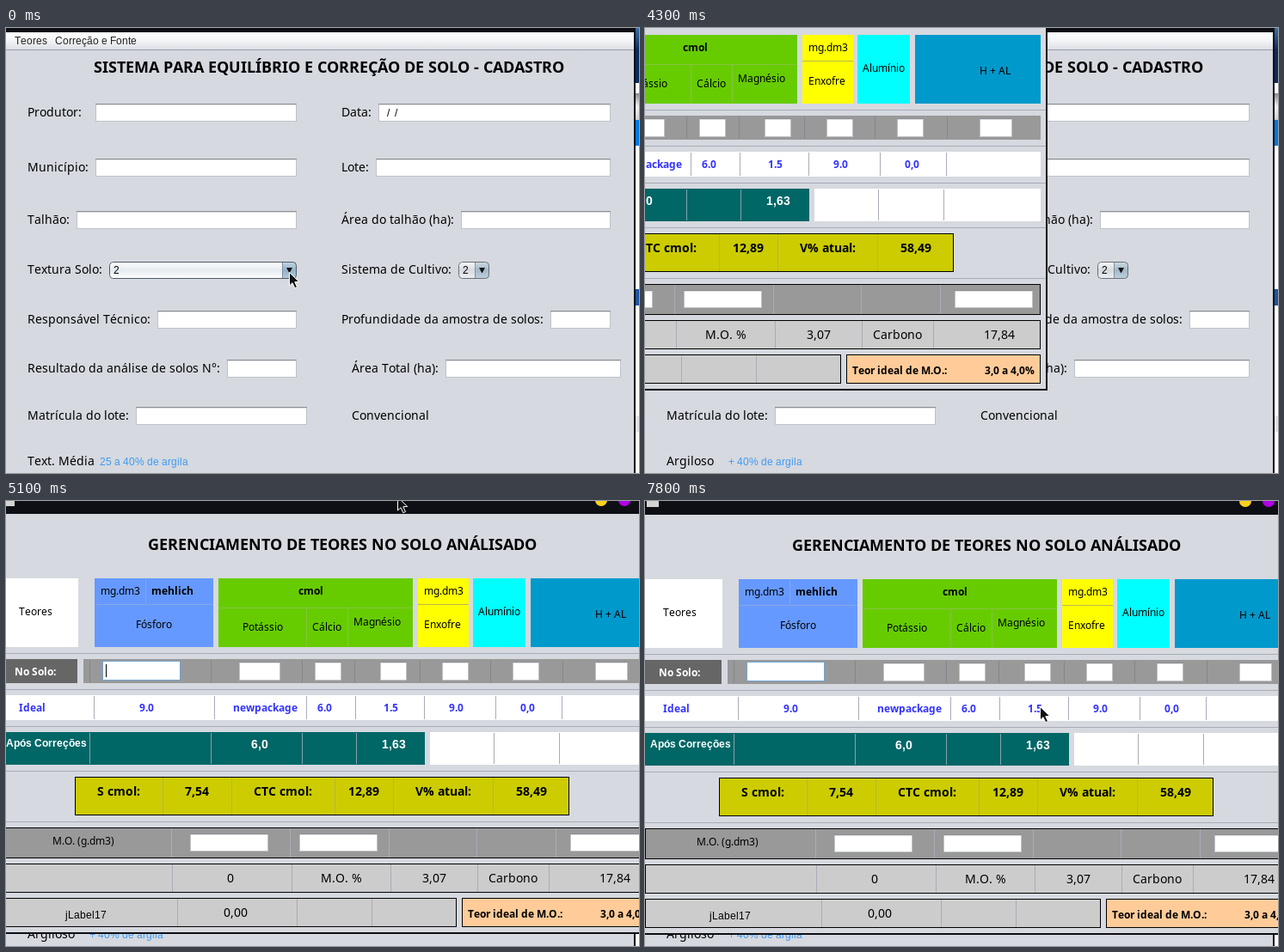
Write an HTML page with a canvas that moves like this. It is 736 by 518 pixels and loops after 8 s.

```html
<!DOCTYPE html>
<html lang="pt">
<head>
<meta charset="utf-8">
<style>
html, body { margin: 0; width: 100%; height: 100%; overflow: hidden; }
canvas { display: block; }
</style>
</head>
<body>
<canvas id="stage" width="736" height="518"></canvas>
<script>
const ctx = document.getElementById('stage').getContext('2d');
const NOTO = '"Noto Sans", sans-serif', ARIAL = '"Liberation Sans", sans-serif';
const F14 = '14px ' + NOTO, F12 = '12px ' + NOTO, B18 = 'bold 18px ' + NOTO;
const B14 = 'bold 14px ' + NOTO, B12 = 'bold 12px ' + NOTO;
const A12 = '12px ' + ARIAL, AB12 = 'bold 12px ' + ARIAL, AB14 = 'bold 14px ' + ARIAL;
const BLACK = '#0d0f14', PANEL = '#d6d9df', LINE = '#a9acb8', SELECT = '#39698a';

// Whole-pixel glyph advances, as the toolkit lays text out.
const advance = ch => Math.round(ctx.measureText(ch).width);

// Returns the x where the text ends.
function text(str, x, y, font = F14, color = '#000') {
  ctx.font = font;
  ctx.fillStyle = color;
  for (const ch of str) {
    ctx.fillText(ch, x, y);
    x += advance(ch);
  }
  return x;
}
function centered(str, x1, x2, y, font, color) {
  ctx.font = font;
  const width = [...str].reduce((sum, ch) => sum + advance(ch), 0);
  text(str, Math.round((x1 + x2 - width) / 2), y, font, color);
}
function rect(x1, y1, x2, y2, color) {
  ctx.fillStyle = color;
  ctx.fillRect(x1, y1, x2 - x1, y2 - y1);
}
function framed(x1, y1, x2, y2, color, border = '#000') {
  rect(x1, y1, x2, y2, border);
  rect(x1 + 1, y1 + 1, x2 - 1, y2 - 1, color);
}
function fade(y1, y2, ...colors) {
  const g = ctx.createLinearGradient(0, y1, 0, y2);
  colors.forEach((c, i) => g.addColorStop(i / (colors.length - 1), c));
  return g;
}
function path(points, x, y) {
  ctx.beginPath();
  points.forEach(([dx, dy]) => ctx.lineTo(x + dx, y + dy));
  ctx.closePath();
}
function circle(x, y, r, color) {
  ctx.fillStyle = color;
  ctx.beginPath();
  ctx.arc(x, y, r, 0, 7);
  ctx.fill();
}
function roundBox(x, y, w, h, r) {
  ctx.beginPath();
  ctx.roundRect(x, y, w, h, r);
}
function field(x1, y1, x2, y2 = y1 + 21) {
  framed(x1, y1, x2, y2, '#fff', '#bfc2c8');
  rect(x1, y1, x2, y1 + 1, '#8d8f94');
  rect(x1 + 1, y1 + 1, x2 - 1, y1 + 2, '#dcdde0');
}
// A band of cells between the given edges, each label centred in its cell.
function row(y1, y2, edges, labels, baseline, fill, { font = F12, color = '#000', line = LINE, border } = {}) {
  const left = edges[0], right = edges[edges.length - 1];
  framed(left, y1, right, y2, fill, border || fill);
  edges.slice(1, -1).forEach(x => rect(x, y1 + 1, x + 1, y2 - 1, line));
  labels.forEach((label, i) => centered(label, edges[i], edges[i + 1], baseline, font, color));
}
// Linear motion through [time, x, y] points.
function along(points, t) {
  const i = points.findIndex(p => t < p[0]);
  if (i <= 0) return points[i < 0 ? points.length - 1 : 0].slice(1);
  const a = points[i - 1], b = points[i], k = (t - a[0]) / (b[0] - a[0]);
  return [1, 2].map(j => Math.round(a[j] + (b[j] - a[j]) * k));
}
function cursor([x, y]) {
  path([[.5, .5], [.5, 16], [4, 12.7], [6.8, 18.7], [9.5, 17.5], [6.8, 11.7], [11.7, 11.4]], x, y);
  ctx.fillStyle = '#111';
  ctx.fill();
  ctx.strokeStyle = '#fff';
  ctx.lineWidth = 1;
  ctx.stroke();
}

const comboStyles = {
  normal: { body: ['#fafbfc', '#d6d9df', '#eef0f3'], arrow: ['#cfdce4', '#a3b8c7', '#c0d2dd'], tip: '#111', edge: '#6a7079' },
  hover: { body: ['#ffffff', '#e6ebf1', '#ffffff'], arrow: ['#c3d5e2', '#94b2c7', '#b2ccdd'], tip: '#111', edge: '#525b66' },
  pressed: { body: ['#8b929c', '#a6acb6', '#c1c6ce'], arrow: ['#2f5a7c', '#467597', '#6f9dbd'], tip: '#fff', edge: '#2b4257' }
};
function combo(x1, x2, value, style, glow) {
  const y = 272, h = 20, w = x2 - x1, split = x2 - 17, s = comboStyles[style];
  ctx.save();
  if (glow) {
    roundBox(x1 - 1.5, y - 1.5, w + 3, h + 3, 5);
    ctx.fillStyle = '#7fa9cb';
    ctx.fill();
  }
  roundBox(x1, y, w, h, 4);
  ctx.clip();
  rect(x1, y, x2, y + h, fade(y, y + h, ...s.body));
  rect(split, y, x2, y + h, fade(y, y + h, ...s.arrow));
  rect(split, y, split + 1, y + h, '#7d92a3');
  ctx.restore();
  roundBox(x1 + .5, y + .5, w - 1, h - 1, 4);
  ctx.strokeStyle = s.edge;
  ctx.lineWidth = 1;
  ctx.stroke();
  path([[-3.5, 0], [3.5, 0], [0, 6.5]], split + 8.5, y + 7);
  ctx.fillStyle = s.tip;
  ctx.fill();
  text(value, x1 + 5, y + 14, A12);
}

function desktop() {
  rect(0, 0, 736, 518, '#fff');
  rect(732, 0, 736, 64, fade(0, 26, '#3b6fa8', '#0b2a5c'));
  rect(732, 76, 736, 107, fade(76, 107, '#888', '#f4f4f4', '#cfcfcf'));
  rect(732, 107, 736, 137, '#0078e0');
  rect(732, 304, 736, 323, '#1f55a0');
  rect(732, 452, 736, 470, '#e4e4e6');
}

const rowCenters = [98, 162, 223, 281, 339, 396, 451];
const leftLabels = ['Produtor:  ', 'Município:', 'Talhão:', 'Textura Solo:', 'Responsável Técnico:',
  'Resultado da análise de solos N°:', 'Matrícula do lote:'];
const rightLabels = ['Data:', 'Lote:', 'Área do talhão (ha):', 'Sistema de Cultivo:',
  'Profundidade da amostra de solos:', 'Área Total (ha):', 'Convencional'];

function form(t) {
  const picked = t >= 1400, open = t >= 300 && !picked;
  const menuOn = t >= 2200 && t < 3100;
  const shift = picked ? 0 : 12;   // the longer description widens the last rows

  rect(0, 0, 732, 518, BLACK);
  rect(0, 5, 730, 518, PANEL);
  rect(0, 5, 730, 25, fade(5, 25, '#ffffff', '#f3f4f6', '#dcdfe4'));
  rect(0, 25, 730, 26, '#9a9ea8');
  if (menuOn) rect(6, 7, 53, 25, SELECT);
  text('Teores', 10, 19, A12, menuOn ? '#fff' : '#222');
  text('Correção e Fonte', 57, 19, A12, '#222');
  text('SISTEMA PARA EQUILÍBRIO E CORREÇÃO DE SOLO - CADASTRO', 102, 52, B18);

  rowCenters.forEach((y, i) => {
    const move = i > 4 ? shift : 0;
    const x1 = text(leftLabels[i], 25, y + 5) + 8;
    const x2 = text(rightLabels[i], 390 + move, y + 5) + 8;
    if (i === 3) {
      const style = open ? 'pressed' : t < 300 ? 'hover' : 'normal';
      combo(x1, 338, picked ? '1' : '2', style, t >= 200 && t < 2200);
      combo(x2, 562, '2', 'normal');
    } else {
      field(x1, y - 10, 338 + (i === 6 ? shift : 0));
      if (i < 6) field(x2, y - 10, 703 + move);
    }
  });
  text('/  /', 443, 103, A12);
  const end = text(picked ? 'Argiloso' : 'Text. Média', 25, 509);
  text(picked ? '+ 40% de argila' : '25 a 40% de argila', picked ? 97 : end + 6, 509, A12, '#3c9bf5');

  if (open) {
    framed(120, 292, 338, 332, '#fff');
    const active = t >= 1000 ? 0 : 1;
    ['1', '2'].forEach((item, i) => {
      const y = 293 + 18 * i;
      if (i === active) rect(121, y, 337, y + 18, SELECT);
      text(item, 125, y + 13, A12, i === active ? '#fff' : '#000');
    });
  }
  if (t >= 2700 && t < 3100) {
    const hot = t >= 3000;
    framed(7, 27, 114, 60, '#f0f1f4', '#8f949c');
    if (hot) rect(8, 33, 113, 54, SELECT);
    text('Teores no Solo', 20, 48, A12, hot ? '#fff' : '#222');
  }
}

function levels(caretOn) {
  rect(-8, -15, 770, 505, BLACK);
  rect(-6, 16, 768, 503, PANEL);
  rect(2, -8, 16, 7, '#d4d4d4');
  circle(698, 0, 7, '#f8d21c');
  circle(725, 0, 7, '#b000e6');
  text('GERENCIAMENTO DE TEORES NO SOLO ANÁLISADO', 171, 58, B18);
  for (const y of [178, 220, 263, 315, 374]) rect(-6, y, 768, y + 1, LINE);

  const blue = '#6699ff', green = '#66cc00', yellow = '#ffff00';
  const bold = { font: B12 }, onBlue = { line: '#86a6e4' }, onGreen = { line: '#85c440' };
  row(91, 171, [0, 90], ['Teores   '], 134, '#fff');
  row(91, 171, [109, 168, 247], ['mg.dm3'], 110, blue, onBlue);
  centered('mehlich', 168, 231, 110, B12);
  row(122, 171, [109, 247], ['Fósforo'], 149, blue);
  row(91, 125, [253, 479], ['cmol    '], 110, green, bold);
  row(125, 171, [253, 355, 403, 479], ['Potássio', 'Cálcio'], 152, green, onGreen);
  centered('Magnésio', 403, 472, 146, F12);
  row(91, 121, [485, 544], ['mg.dm3'], 110, yellow);
  row(121, 171, [485, 544], ['Enxofre '], 149, yellow);
  row(91, 171, [549, 610], ['Alumínio'], 134, '#00ffff');
  row(91, 171, [616, 762], [], 0, '#0099cc');
  text('H + AL', 691, 137, F12);
  rect(109, 121, 247, 122, onBlue.line);
  rect(253, 125, 479, 126, onGreen.line);
  rect(485, 121, 544, 122, '#b9b94a');

  row(185, 213, [0, 89], ['No Solo:   '], 204, '#666', { font: B12, color: '#fff' });
  row(185, 213, [96, 103, 244, 350, 411, 487, 569, 653, 762], [], 0, '#999', { line: '#85868c' });
  framed(118, 187, 209, 210, '#fff', '#73a4d1');
  field(277, 188, 325, 210);
  for (const x of [365, 441, 513, 595]) field(x, 188, x + 31, 210);
  field(691, 188, 729, 210);
  if (caretOn) rect(122, 191, 123, 206, '#000');

  // Spaces inside labels nudge them off centre.
  row(227, 256, [-36, 108, 248, 355, 412, 492, 575, 652, 762],
    ['Ideal', '9.0      ', '    newpackage', '6.0     ', ' 1.5', '9.0   ', '0,0 '],
    246, '#fff', { font: B12, color: '#3333ff' });

  row(270, 308, [0, 103, 244, 350, 413, 493], ['', '', '  6,0', '', '  1,63'], 289, '#006666',
    { font: AB14, color: '#fff', line: '#86a3a9' });
  text('Após Correções', 6, 287, AB12, '#fff');
  row(270, 308, [499, 573, 649, 762], [], 0, '#fff');

  row(322, 367, [86, 188, 268, 388, 456, 572, 661],
    ['S cmol:', '7,54', 'CTC cmol:', '12,89', 'V% atual:', '58,49'],
    344, '#cccc00', { font: B14, line: '#b6b640', border: '#000' });

  const boxed = { font: F14, border: '#000' };
  row(381, 417, [0, 198, 336, 451, 553, 645, 762], ['M.O. (g.dm3)  '], 401, '#999', { border: '#000' });
  for (const x of [220, 347, 662]) field(x, 388, x + 91, 409);
  row(423, 457, [0, 199, 338, 453, 554, 637, 762],
    ['', '0 ', 'M.O. %', '3,07', 'Carbono', '       17,84'], 445, '#ccc', boxed);
  row(463, 497, [0, 205, 344, 431, 530], ['', '0,00 '], 485, '#ccc', boxed);
  text('jLabel17', 75, 487, A12);
  row(463, 497, [536, 762], [], 0, '#ffcc99', boxed);
  text('Teor ideal de M.O.:', 543, 486, B12);
  text('3,0 a 4,0%', 697, 486, B12);
}

const formPath = [[100, 329, 284], [500, 325, 312], [800, 325, 312], [1200, 302, 306],
  [1500, 302, 306], [2200, 46, 11], [2300, 46, 11], [2400, 35, 28]];
const levelsPath = [[5300, 461, -4], [6000, 175, 241], [6100, 173, 239], [6300, 173, 239],
  [7000, 421, 243], [7100, 421, 243], [7800, 459, 239]];

function draw(t) {
  desktop();
  form(t);
  if (t < 3100) cursor(along(formPath, t));
  if (t >= 4300) {
    // The dragged window slows down into place.
    const left = Math.max(0, (5300 - t) / 1000);
    ctx.save();
    ctx.translate(Math.round(-302 * left ** 2.43), Math.round(-83 * left ** 3.05));
    levels(t >= 5000 && Math.floor(t / 500) % 2 === 0);
    cursor(along(levelsPath, t));
    ctx.restore();
  }
}
function tick() {
  draw(Math.floor(performance.now() % 8000 / 100) * 100);
  requestAnimationFrame(tick);
}
tick();
</script>
</body>
</html>
```
